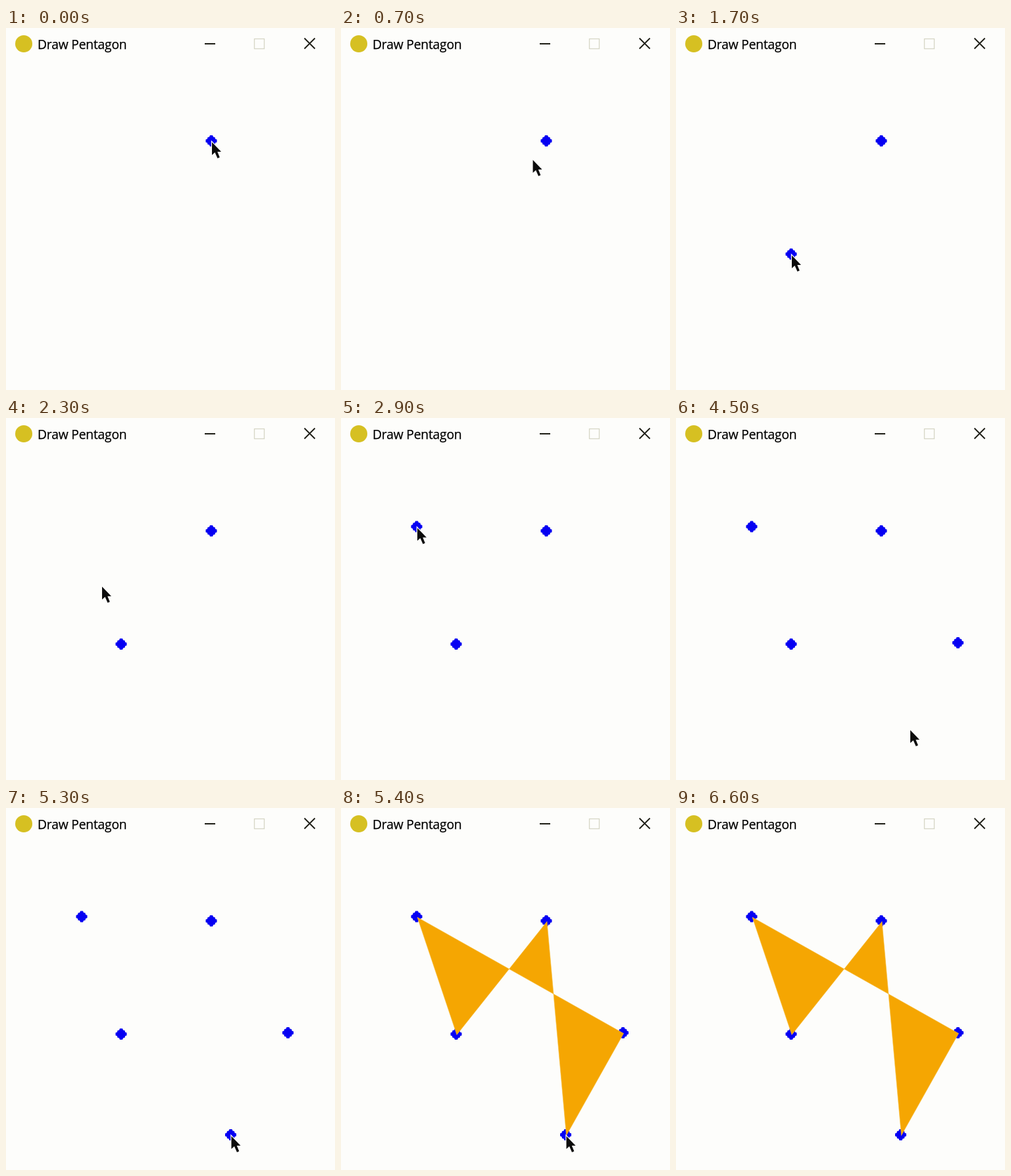
Animation of 500x550 px, one loop 7000 ms. Source, as an HTML page:

```html
<!DOCTYPE html>
<html lang="en">
<head>
<meta charset="utf-8">
<title>Draw Pentagon</title>
<style>
  html, body { margin: 0; width: 100%; height: 100%; overflow: hidden; background: #fdfdfb; }
  svg { display: block; width: 500px; height: 550px; }
  text { font: 19.3px "Open Sans", "Noto Sans", sans-serif; letter-spacing: -.2px; stroke: #000; stroke-width: .25; }
</style>
</head>
<body>
<svg viewBox="0 0 500 550">
  <defs>
    <path id="dot" fill="#0600f2"
      d="M-2-8.5H2L3-6 5.5-5.5 6-3 8.5-2V2L6 3 5.5 5.5 3 6 2 8.5H-2L-3 6-5.5 5.5-6 3-8.5 2V-2L-6-3-5.5-5.5-3-6Z"/>
  </defs>
  <circle cx="27" cy="24" r="13" fill="#d6c022"/>
  <text x="48" y="31.5">Draw Pentagon</text>
  <g fill="none" stroke="#1c1c14" stroke-width="1.8">
    <path d="M302 24h16M453.5 15.5l16 16m0-16l-16 16"/>
    <rect x="377.5" y="16.5" width="15" height="15" stroke="#d6d6c6" stroke-width="1.3"/>
  </g>
  <g id="dots"></g>
  <polygon id="shape" fill="#f5a602" stroke="#f6c040" stroke-width=".6"/>
  <path id="cursor" d="M1 2V21.5L5.5 17.5L9.5 26.5L12.8 25L9.3 16.5H15Z"
    fill="#0c0c0c" stroke="#fdfdfb" stroke-width="2.4" paint-order="stroke"/>
</svg>
<script>
const LOOP = 7000, STEP = 100;
const FILL_AT = 5400, CURSOR_END = 6600;

// The pointer sets off for each corner, arrives, then clicks
const corners = [
  { x: 312, y: 171.5, leave: -800, arrive: 0, click: 0 },
  { x: 175, y: 343.5, leave: 500, arrive: 1300, click: 1500 },
  { x: 115, y: 165, leave: 1900, arrive: 2700, click: 2800 },
  { x: 428.5, y: 341.5, leave: 3100, arrive: 3900, click: 4100 },
  { x: 341.5, y: 496.5, leave: 4200, arrive: 4600, click: 5000 }
];

const byId = id => document.getElementById(id);
const show = (el, on) => el.setAttribute("visibility", on ? "visible" : "hidden");
const moveTo = (el, x, y) => el.setAttribute("transform", `translate(${x} ${y})`);
const smooth = k => k * k * (3 - 2 * k);

const dots = corners.map(({ x, y }) => {
  const dot = document.createElementNS("http://www.w3.org/2000/svg", "use");
  dot.setAttribute("href", "#dot");
  moveTo(dot, x, y);
  return byId("dots").appendChild(dot);
});
byId("shape").setAttribute("points", corners.map(({ x, y }) => [x + 1, y + 1]).join(" "));

function pointerAt(t) {
  let { x, y } = corners[0];
  for (const c of corners) {
    const k = smooth(Math.min(1, Math.max(0, (t - c.leave) / (c.arrive - c.leave))));
    x += (c.x - x) * k;
    y += (c.y - y) * k;
  }
  return [x, y];
}

function draw(now) {
  const t = Math.floor((now % LOOP) / STEP) * STEP;
  dots.forEach((dot, i) => show(dot, t >= corners[i].click));
  show(byId("shape"), t >= FILL_AT);
  show(byId("cursor"), t < CURSOR_END);
  moveTo(byId("cursor"), ...pointerAt(t));
}

const start = performance.now();
function tick() {
  draw(performance.now() - start);
  requestAnimationFrame(tick);
}
tick();
</script>
</body>
</html>
```
